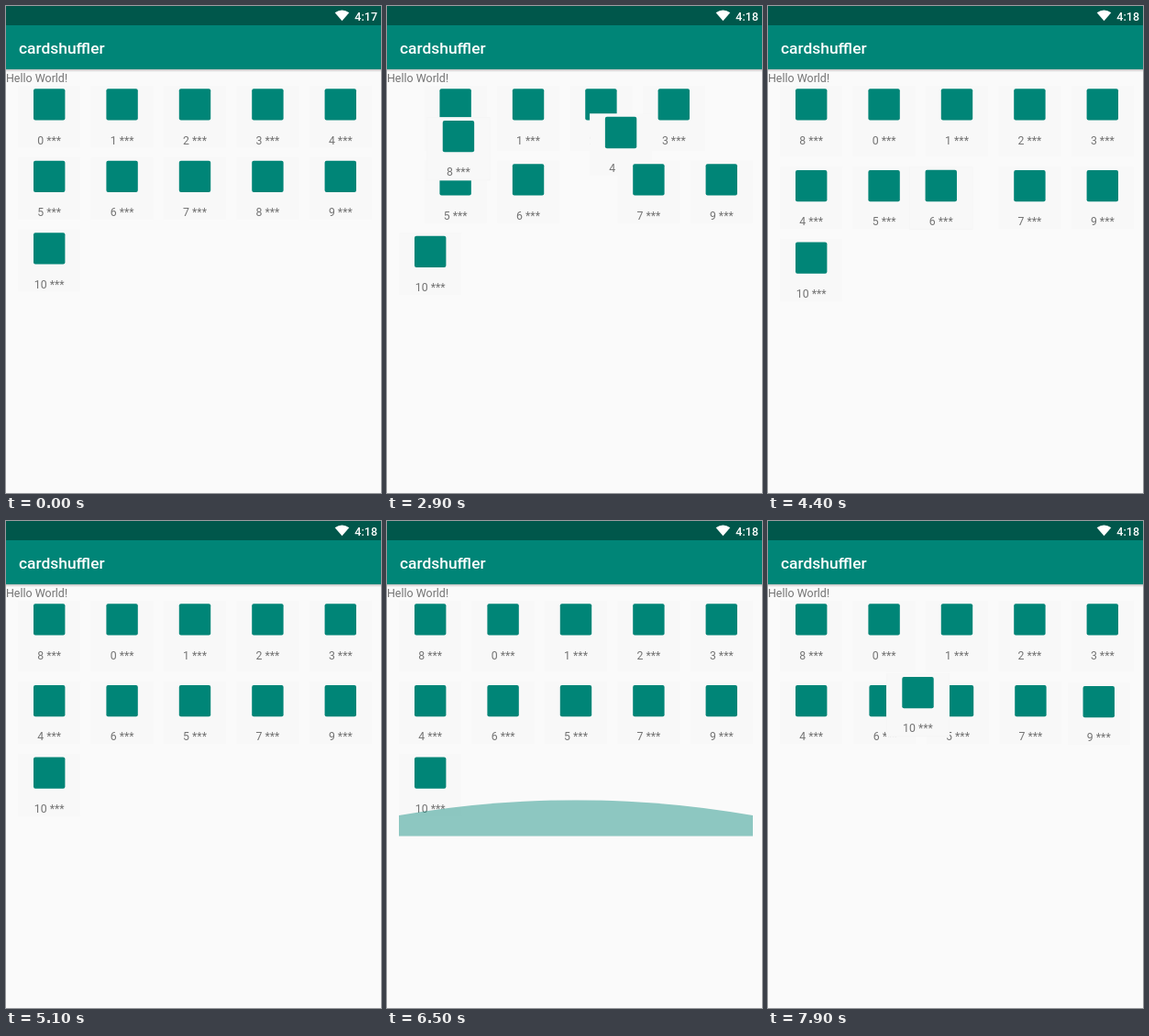
Animation of 409 by 531 pixels, one loop 8000 ms. Source, as an HTML page with a canvas:

```html
<!DOCTYPE html>
<html lang="en">
<head>
<meta charset="utf-8">
<title>cardshuffler</title>
<style>
  html, body { margin: 0; width: 100%; height: 100%; overflow: hidden; background: #fafafa; }
  canvas { display: block; width: 409px; height: 531px; }
</style>
</head>
<body>
<canvas id="stage"></canvas>
<script>
const W = 409, H = 531, LOOP = 8000, STEP = 100;
const TEAL = '#008577', PAGE = '#fafafa', CARD = '#f8f8f8', GREY = '#747474';
const LIST = { x: 13, y: 86.5, w: 386, bottom: 343.7 };
const COUNT = 11, ICON = 34.4, TILE = 68, SLIDE = 250, GROW_AT = 2800;

const canvas = document.getElementById('stage');
const ratio = window.devicePixelRatio || 1;
canvas.width = W * ratio;
canvas.height = H * ratio;
const ctx = canvas.getContext('2d');
ctx.scale(ratio, ratio);

const mix = (a, b, p) => a + (b - a) * p;
const ease = p => (1 - Math.cos(Math.PI * Math.min(1, Math.max(0, p)))) / 2;

// Each move takes a card out of the order and inserts it at another index
const moves = [
  { at: 2650, card: 8, to: 7 },
  { at: GROW_AT, card: 8, to: 0 },
  { at: 4480, card: 6, to: 6 },
  { at: 7882, card: 10, to: 6 }
];
const start = Array.from({ length: COUNT }, (_, i) => i);
let order = start;
for (const move of moves) {
  order = order.filter(card => card !== move.card);
  order.splice(move.to, 0, move.card);
  move.order = order;
}

// A held card travels to its far point by `peak`, then settles home by `end`
const drags = [
  { card: 8, show: 2500, start: 2450, peak: 3100, end: 3400, far: [20.8, 97.3] },
  { card: 6, show: 4400, start: 4270, peak: 4800, end: 5100, far: [84, 177] },
  { card: 10, show: 7600, start: 7800, peak: 7900, end: LOOP, far: [163.5, 169.7] }
];

function slot(index, grown) {
  const row = Math.floor(index / 5);
  return [47.2 + 79.4 * (index % 5), 90 + 78.5 * row + (row && grown ? 10.2 : 0)];
}

function place(card, t) {
  let [x, y] = slot(card, false);
  for (const move of moves) {
    const p = ease((t - move.at) / SLIDE);
    const [tx, ty] = slot(move.order.indexOf(card), move.at >= GROW_AT);
    x = mix(x, tx, p);
    y = mix(y, ty, p);
  }
  return [x, y];
}

function dragPlace(drag, t) {
  const [x, y] = place(drag.card, drag.start);
  const [hx, hy] = place(drag.card, drag.end);
  const out = ease((t - drag.start) / (drag.peak - drag.start));
  const back = ease((t - drag.peak) / (drag.end - drag.peak));
  return [
    mix(mix(x, drag.far[0], out), hx, back),
    mix(mix(y, drag.far[1], out * out), hy, back)
  ];
}

function text(str, x, y, size, color, weight = 400, align = 'left') {
  ctx.font = `${weight} ${size}px Roboto, sans-serif`;
  ctx.textAlign = align;
  ctx.fillStyle = color;
  ctx.fillText(str, x, y);
}

function rect(x, y, w, h, color) {
  ctx.fillStyle = color;
  ctx.fillRect(x, y, w, h);
}

function drawCard(card, x, y, lifted, extra) {
  const left = x - TILE / 2, top = y - 3.4;
  if (lifted) rect(left - 0.5, top, TILE + 1, TILE + 1, '#f4f4f4');
  rect(left, top, TILE, TILE + extra, CARD);
  ctx.fillStyle = TEAL;
  ctx.beginPath();
  ctx.roundRect(x - ICON / 2, y + 0.2, ICON, ICON, 2);
  ctx.fill();
  text(`${card} ***`, x, y + 60.6, 12.3, GREY, 400, 'center');
}

function drawGlow(t) {
  const u = (t - 6000) / 800;
  if (u <= 0 || u >= 1) return;
  const scale = 1.08 * Math.sin(Math.PI * u);
  const r = LIST.w * 1.5, depth = r * (1 - Math.cos(Math.PI / 6));
  ctx.save();
  ctx.translate(LIST.x + LIST.w / 2, LIST.bottom);
  ctx.scale(1, 0.51 * scale);
  ctx.beginPath();
  ctx.rect(-LIST.w / 2, -depth, LIST.w, depth);
  ctx.clip();
  ctx.beginPath();
  ctx.arc(0, r - depth, r, 0, Math.PI * 2);
  ctx.fillStyle = `rgba(0, 133, 119, ${0.44 * Math.min(1, scale)})`;
  ctx.fill();
  ctx.restore();
}

function drawList(t) {
  ctx.save();
  ctx.beginPath();
  ctx.rect(LIST.x, LIST.y, LIST.w, LIST.bottom - LIST.y);
  ctx.clip();

  const drag = drags.find(d => t >= d.show && t < d.end);
  const extra = 10 * ease((t - GROW_AT) / SLIDE);
  for (const card of start) {
    if (drag && drag.card === card) continue;
    const [x, y] = place(card, t);
    drawCard(card, x, y, false, y < 100 ? extra : 0);
  }
  if (drag) drawCard(drag.card, ...dragPlace(drag, t), true, 0);
  drawGlow(t);
  ctx.restore();
}

function drawBars(t) {
  const shade = ctx.createLinearGradient(0, 69, 0, 72);
  shade.addColorStop(0, 'rgba(0, 0, 0, 0.24)');
  shade.addColorStop(1, 'rgba(0, 0, 0, 0)');
  rect(0, 69, W, 3, shade);
  rect(0, 0, W, 21, '#00574b');
  rect(0, 21, W, 48, TEAL);

  ctx.fillStyle = '#fff';
  ctx.beginPath();
  ctx.moveTo(366.5, 16.2);
  ctx.lineTo(358.7, 7.2);
  ctx.quadraticCurveTo(366.5, 2, 374.3, 7.2);
  ctx.fill();

  text(t < 1100 ? '4:17' : '4:18', 405, 15.5, 12.5, '#fff', 500, 'right');
  text('cardshuffler', 14, 51.5, 17.4, '#fff', 500);
}

function draw(t) {
  rect(0, 0, W, H, PAGE);
  text('Hello World!', 0, 82.6, 12.45, GREY);
  drawList(t);
  drawBars(t);
}

const begin = performance.now();
function tick() {
  const t = (performance.now() - begin) % LOOP;
  draw(Math.floor(t / STEP) * STEP);
  requestAnimationFrame(tick);
}
tick();
</script>
</body>
</html>
```
